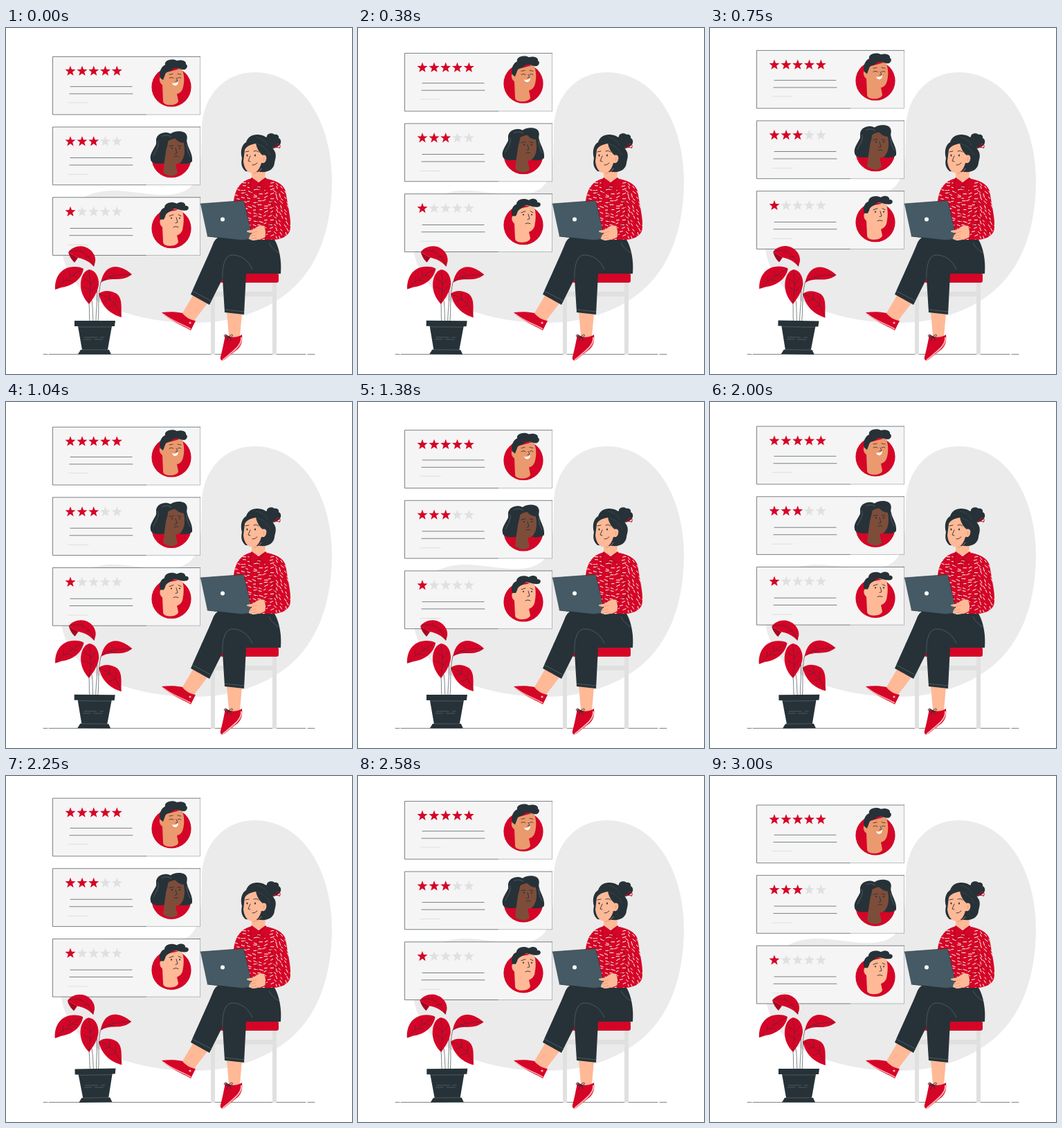
Write an HTML page that moves like this. It is 500x500 px and loops after 3.04 s.

```html
<!DOCTYPE html>
<html lang="en">
<head>
<meta charset="utf-8">
<title>Customer reviews</title>
<style>
html, body { margin: 0; width: 100%; height: 100%; overflow: hidden; background: #fff; }
svg { display: block; width: 100vw; height: 100vh; }
.red { fill: #d50527; }
.dark { fill: #263238; }
.skin { fill: #ffb996; }
.grey { fill: #e0e0e0; }
.ink { fill: none; stroke: #263238; stroke-width: .6; stroke-linecap: round; stroke-linejoin: round; }
.fold { fill: none; stroke: #8c0a1e; stroke-width: .7; stroke-linecap: round; }
.seam { fill: none; stroke: #65727a; stroke-width: .6; }
.dash { fill: none; stroke: #fff; stroke-width: 1; stroke-linecap: round; }
</style>
</head>
<body>
<svg viewBox="0 0 500 500">
  <defs>
    <path id="shirt" d="M356 217C341 220 331 230 329 252L343 250L356 306L386 306C402 305 411 299 411 287C412 274 406 252 405 240C403 227 394 222 378 218L366 226Z"/>
    <clipPath id="shirtClip"><use href="#shirt"/></clipPath>
  </defs>

  <path fill="#ebebeb" d="M283 145C284 98 316 64 359 64C430 64 471 139 471 220C471 298 446 360 391 394C357 415 318 426 270 426C220 426 168 415 130 393C98 375 80 342 79 308C79 262 108 236 152 235C190 235 220 246 249 239C287 229 281 186 283 145Z"/>
  <path class="ink" d="M54 471.5H60M62 471.5H433M436 471.5H446"/>

  <g id="cards"></g>

  <!-- plant -->
  <g id="plant">
    <path class="ink" d="M120 398C121 408 120 415 121 424M124 394C126 406 125 415 126 424M131 370C133 390 130 406 130 424M137 367C132 388 135 408 133 424"/>
    <path class="red" d="M90 324C95 317 105 314 113 316C124 319 130 329 129 337L127 345C121 338 114 334 104 332Z"/>
    <path fill="#a8041f" d="M90 324L104 332L99 339C95 335 92 331 90 324Z"/>
    <path class="red" d="M71 378C70 361 79 345 99 345C105 345 109 346 112 348C109 364 95 373 80 375Z"/>
    <path class="red" d="M120 349C129 350 134 359 134 370C133 381 126 391 120 399C112 391 107 380 108 368C109 358 113 351 120 349Z"/>
    <path class="red" d="M137 368C140 353 147 345 159 345C169 346 176 351 182 356C173 363 165 363 157 363C149 363 143 364 137 368Z"/>
    <path class="red" d="M134 384C141 378 152 379 160 384C169 391 166 405 167 418C153 414 139 405 134 384Z"/>
    <path class="ink" style="stroke-width:.5" d="M92 323C106 319 119 325 127 343M107 320L112 325M114 331L121 330M73 376C84 366 94 357 110 349M83 360V367M92 352L93 360M87 365L95 365M96 358L103 359M120 352C123 367 122 382 120 397M113 362L122 368M112 374L122 379M129 362L122 371M129 374L122 382M138 366C148 358 162 356 180 356M151 352L156 357M149 360L158 362M136 385C150 389 160 399 166 415M149 383L150 391M159 389L158 398M142 394L151 392M148 404L159 400"/>
    <path class="dark" d="M99 423H158L157 431H153L147 465H149L152 471.5H104L108 465H110L104 431H99Z"/>
    <path class="seam" d="M105 432H152M113 447H132M136 447H142M112 450H123M127 450H140M110 465H147"/>
  </g>

  <!-- chair -->
  <path class="grey" d="M296 366H302V381H385V366H391V472H385V388H302V472H296Z"/>
  <rect class="red" x="309" y="354" width="85" height="14" rx="3"/>

  <!-- legs and shoes -->
  <path class="skin" d="M271 385L291 398L271 424C264 423 257 418 255 412ZM319 410L341 412L338 446C333 449 326 448 322 445Z"/>
  <path class="red" d="M225 411C236 410 246 410 255 412C259 418 267 422 274 423L267 437C254 429 238 424 225 411Z"/>
  <path fill="none" stroke="#ffb3b3" stroke-width="1.6" d="M227 413C240 424 254 427 267 435"/>
  <circle cx="266" cy="426" r="1.6" fill="#ffb3b3"/>
  <path class="red" d="M317 443C324 448 334 448 341 443C342 453 340 459 335 464L316 479C312 482 309 480 310 475C313 464 315 454 317 443Z"/>
  <path fill="none" stroke="#ffb3b3" stroke-width="2" d="M340 447C341 457 334 463 313 480"/>
  <path class="ink" style="stroke-width:1" d="M322 446C317 441 314 444 316 446C318 448 321 447 322 446C327 441 329 444 326 446C324 448 322 446 322 446L319 452M322 446L325 451"/>
  <path class="dark" d="M313 301C325 297 345 304 357 307L386 303C394 313 399 335 397 355L347 355L344 414L316 411L313 362L294 400L267 385C280 355 292 330 300 310C303 304 308 301 313 301Z"/>
  <path class="seam" d="M313 362C312 343 317 328 327 328C339 328 350 335 356 349M269 380L296 394M316 407L344 410M380 310C384 318 389 322 395 325"/>

  <!-- blouse -->
  <use href="#shirt" class="red"/>
  <g clip-path="url(#shirtClip)"><path id="dashes" class="dash"/></g>
  <path class="fold" d="M366 226C363 243 360 265 363 284M381 246C386 258 389 270 387 283M374 287C382 285 389 280 393 275M342 233C346 240 348 247 348 252"/>

  <!-- head -->
  <path class="skin" d="M355 202L355 217C359 222 364 223 374 219L376 196Z"/>
  <path class="red" d="M355 216C350 221 351 229 354 237L366 226L377 236C382 229 381 221 375 216L365 223Z"/>
  <path class="fold" d="M355 217C352 225 353 230 354 237L366 226L377 236M375 217L366 226"/>
  <path class="dark" d="M376 171C373 164 375 158 377 157C377 152 385 151 388 154C393 153 395 157 394 159C399 161 398 169 393 171C389 175 382 175 376 171Z"/>
  <path fill="none" stroke="#d50527" stroke-width="1" d="M379 173C386 175 391 171 392 167C397 168 397 171 395 174M388 172L396 173"/>
  <path class="dark" d="M347 165C350 155 360 152 370 155C382 159 382 168 387 176C392 183 389 189 388 195C387 205 378 209 368 208L346 207C341 202 339 197 341 188C338 178 341 168 347 165Z"/>
  <path class="skin" d="M345 176C347 171 354 168 361 167C363 175 366 180 371 184C376 182 378 188 375 193C373 196 371 195 369 195C367 203 363 209 356 210C348 209 344 202 343 193Z"/>
  <path class="ink" style="stroke-width:.9" d="M346 179L351 178M358 178Q362 176 365 179M353 185L350 192L353 193M356 198Q359 199 363 195"/>
  <ellipse class="dark" cx="348.5" cy="184" rx="1" ry="1.5"/>
  <ellipse class="dark" cx="360" cy="184" rx="1" ry="1.5"/>
  <path fill="none" stroke="#e58d70" stroke-width=".8" d="M357 210C363 210 367 207 369 203M372 187Q374 188 372 192"/>
  <path class="seam" style="opacity:.5" d="M361 167C371 169 377 175 382 184M362 158Q374 160 378 170"/>

  <!-- laptop and hand -->
  <path fill="#37474f" d="M291 301L341 307L357 304L354 292Z"/>
  <path fill="#455a64" d="M281 254L342 249.5L344 251L354 296L353 305L340 306L291 301Z"/>
  <path class="ink" d="M281 254L342 249.5L344 251L355 298M291 301L341 307L356 305"/>
  <circle cx="313" cy="276.5" r="3" fill="#fff"/>
  <path class="skin" d="M375 287C368 284 363 286 358 291L348 293C348 296 352 296 356 296C352 299 351 303 351 305C358 307 367 307 375 302Z"/>
  <path fill="none" stroke="#e58d70" stroke-width=".7" d="M356 296L363 294M353 301L361 299M355 305L362 303"/>
  <path class="fold" d="M374 287Q377 295 375 303"/>
</svg>
<script>
const $ = id => document.getElementById(id);
const LOOP = 3040;

let seed = 7;
const random = () => (seed = seed * 16807 % 2147483647) / 2147483647;

function star(cx, cy, color) {
  const points = Array.from({ length: 10 }, (_, i) => {
    const r = i % 2 ? 3.3 : 7.9, a = i * Math.PI / 5 - Math.PI / 2;
    return `${cx + r * Math.cos(a)},${cy + r * Math.sin(a)}`;
  });
  return `<polygon class="${color}" points="${points.join(' ')}"/>`;
}

// Heads are drawn around the centre of their circle.
const heads = [
  `<path fill="#eb996e" d="M-11-20L15-27C19-18 19-8 17 0C15 7 12 9 8 10L10 20C10 24 3 26-1 26C-8 26-12 24-12 20L-13-3C-18-6-19-15-13-17Z"/>
   <path class="dark" d="M-16-13C-19-22-14-30-9-32C-11-39 2-42 8-38C14-40 22-38 21-33C25-31 22-25 18-25C11-26 5-30 0-24C-4-22-8-22-9-18L-12-10Z"/>
   <path fill="#fff" d="M1-6Q6-4 10-8Q10-3 6-2Q2-2 1-6Z"/>
   <path class="ink" style="stroke-width:.8" d="M-3-18L2-19M9-19L14-18M-3-13Q0-15 3-13M9-13Q12-15 14-13M7-13L9-9L6-8"/>`,
  `<path class="dark" d="M-22-27C-20-36-9-39-1-35C4-40 20-40 22-33C24-28 21-26 23-21C25-12 31-6 30 5C26 9 18 9 13 8L-13 8C-22 9-30 7-30 2C-32-5-25-13-22-20Z"/>
   <path fill="#7d4d3a" d="M-6-23C-1-28 10-30 17-25C20-15 20-3 15 4C13 8 9 9 6 9L9 22C5 27-5 27-12 21L-10 5Z"/>
   <path class="dark" d="M-5-28C-4-17-9-11-10-4L-13 8L-24 8L-22-20ZM3-31C9-23 15-21 20-22L17-34Z"/>
   <path class="ink" style="stroke-width:.9" d="M-3-17L3-18M9-18L14-17M6-14L8-7L5-6M4-2Q7-4 10-2"/>
   <circle class="dark" cx="1" cy="-14" r="1.1"/><circle class="dark" cx="12" cy="-14" r="1.1"/>
   <path class="seam" d="M-20-25C-16-18-23-10-26-3M22-20Q22-10 27-2M-14-31Q-6-35 0-30"/>`,
  `<path class="skin" d="M-10-23L15-28C19-18 18-7 16 2C14 7 11 9 8 10L10 19C9 24 2 25-2 25C-8 25-12 23-12 19L-13-2C-18-6-18-14-12-16Z"/>
   <path class="dark" d="M-16-13C-19-21-15-29-10-30C-10-37 0-40 8-36C14-40 21-37 20-33C27-33 26-26 20-26C12-25 6-31 1-27C-3-23-8-23-9-17L-11-13Z"/>
   <path class="ink" style="stroke-width:.9" d="M-3-18L3-20M10-20L14-18M7-16L9-9L6-8M3-2Q6-4 10-2"/>
   <circle class="dark" cx="0" cy="-15" r="1.1"/><circle class="dark" cx="12" cy="-15" r="1.1"/>`
];

function card({ y, score, lines, centre }, i) {
  const stars = [93, 110, 126.7, 143.5, 160.3]
    .map((x, n) => star(x, y + 21, n < score ? 'red' : 'grey')).join('');
  const [a, b, c] = lines.map(d => y + d);
  return `<rect x="67.5" y="${y}" width="213" height="83.7" fill="#f5f5f5"/>
    <path class="ink" d="M280.5 ${y}H67.5V${y + 83.7}H202"/>
    <path class="ink" style="opacity:.5" d="M202 ${y + 83.7}H280.5V${y}"/>
    ${stars}
    <path class="ink" d="M93 ${a}H182M92 ${b}H183"/>
    <path class="ink" style="opacity:.2" d="M90 ${c}H119"/>
    <g transform="translate(239 ${y + centre})"><circle class="red" r="28.6"/>${heads[i]}</g>`;
}

$('cards').innerHTML = [
  { y: 42, score: 5, lines: [43.2, 53.6, 66.5], centre: 43.8 },
  { y: 143.6, score: 3, lines: [44.5, 55, 68.5], centre: 44.7 },
  { y: 245.3, score: 1, lines: [44.7, 55, 68.5], centre: 45 }
].map(card).join('');

let dashes = '';
for (let y = 222; y < 305; y += 5.5) {
  for (let x = 330; x < 412; x += 8) {
    const px = x + random() * 5, py = y + random() * 3;
    const angle = (x > 384 ? 1 : x > 364 ? -.25 : .15) + (random() - .5) * .6;
    const len = 3 + random() * 2.5;
    dashes += `M${px} ${py}l${len * Math.cos(angle)} ${len * Math.sin(angle)}`;
  }
}
$('dashes').setAttribute('d', dashes);

// Triangle wave: 0 at phase 0, 1 at 1/4, -1 at 3/4.
const sway = p => 1 - 4 * Math.abs((p + .25) % 1 - .5);

function draw(now) {
  const phase = (now + 40) % LOOP / LOOP;
  const lift = 10 * (1 - Math.abs(1 - phase * 4 % 2));
  $('cards').setAttribute('transform', `translate(0 ${-lift})`);
  $('plant').setAttribute('transform', `rotate(${sway(phase)} 127 393)`);
  requestAnimationFrame(draw);
}
const start = performance.now();
draw(0);
function tick() { }
</script>
</body>
</html>
```
